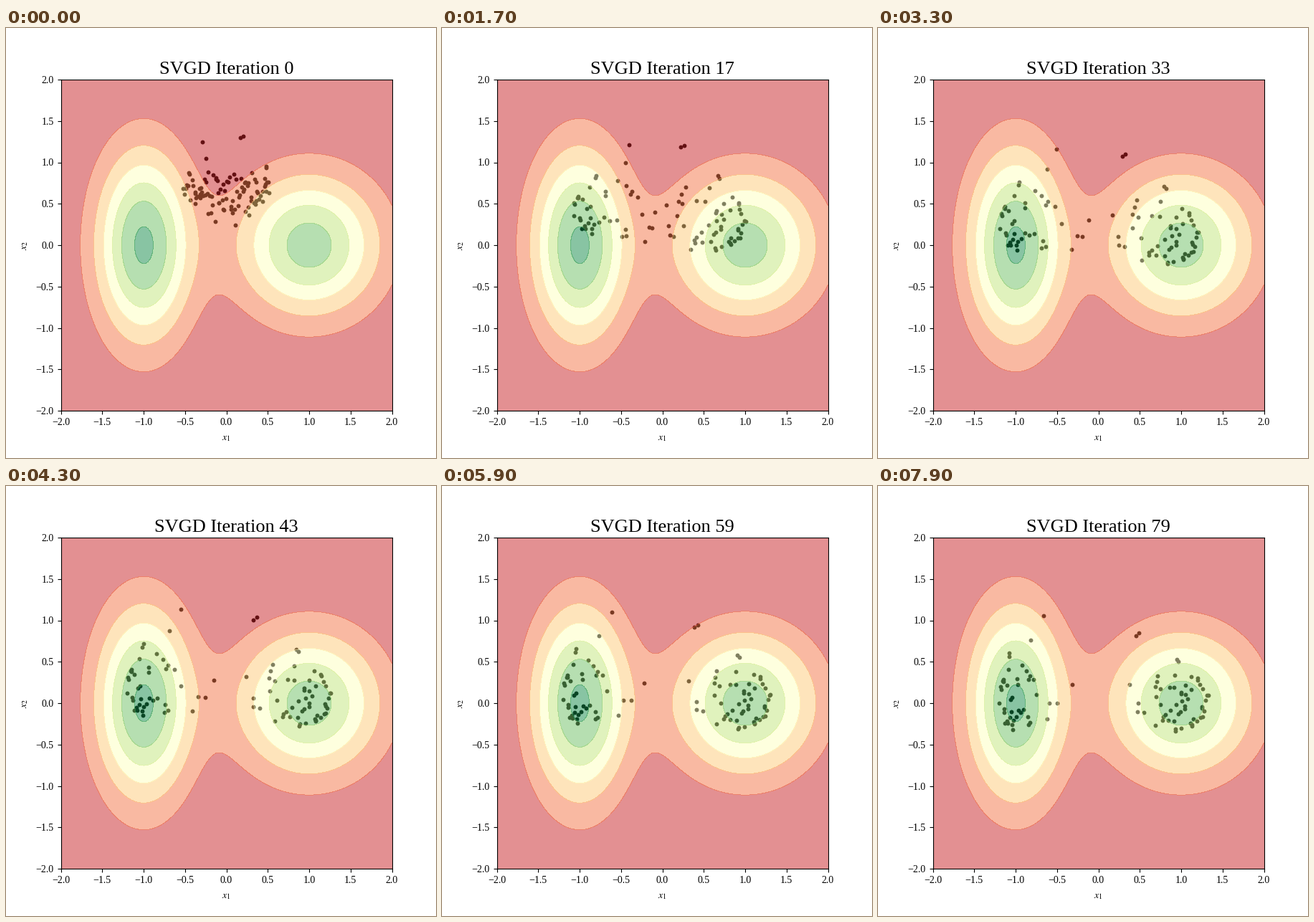
A matplotlib script that plays this animation: 600 by 600 pixels, repeating every 8000 ms.

```python
import numpy as np
import matplotlib.pyplot as plt
from matplotlib.animation import FuncAnimation

plt.rcParams["font.family"] = "Liberation Serif"
plt.rcParams["mathtext.fontset"] = "stix"

FRAMES, INTERVAL = 80, 100
COUNT, STEP = 100, 0.1

# Two equally weighted Gaussians with diagonal covariance
MEANS = np.array([[-1.0, 0.0], [1.0, 0.0]])
VARS = np.array([[0.16, 0.64], [0.36, 0.36]])

# The stragglers around the rim of the starting cloud
RIM = [(-0.29, 1.25), (0.17, 1.30), (0.20, 1.32), (-0.25, 1.05),
       (0.48, 0.95), (0.27, 0.36), (0.11, 0.24), (-0.13, 0.29)]


def components(x):
    """Weighted density of each Gaussian at the points x (n, 2)."""
    d = x[:, None] - MEANS
    norm = 4 * np.pi * np.sqrt(VARS.prod(axis=1))
    return np.exp(-0.5 * (d**2 / VARS).sum(axis=2)) / norm


def score(x):
    w = components(x)
    w /= w.sum(axis=1, keepdims=True)
    return (w[..., None] * (MEANS - x[:, None]) / VARS).sum(axis=1)


def start_points():
    """Crescent-shaped cloud: dense along its lower edge, thinner above."""
    rng = np.random.default_rng(4)
    n = COUNT - len(RIM)
    x = np.linspace(-0.52, 0.53, n) + rng.normal(0, 0.01, n)
    height = 0.75 - 0.7 * np.abs(x)
    y = 0.33 + x**2 + height * rng.beta(1.3, 2, n)
    return np.vstack([RIM, np.column_stack([x, y])])


def advance(x):
    diff = x[:, None] - x
    sq = (diff**2).sum(axis=2)
    h = np.median(sq) / np.log(COUNT)
    k = np.exp(-sq / h)
    push = 0.17 * h**-1.4 * (k[..., None] * diff).sum(axis=1)
    return x + STEP / COUNT * (k @ score(x) + push)


path = [start_points()]
while len(path) < FRAMES:
    path.append(advance(path[-1]))

fig, ax = plt.subplots(figsize=(6, 6), dpi=100)
dots = ax.scatter(*path[0].T, s=18, c="black", linewidths=0)

axis = np.linspace(-2, 2, 200)
gx, gy = np.meshgrid(axis, axis)
density = components(np.column_stack([gx.ravel(), gy.ravel()])).sum(axis=1)
ax.contourf(gx, gy, density.reshape(gx.shape), levels=np.arange(8) * 0.04,
            cmap="RdYlGn", alpha=0.5)

ticks = np.arange(-2, 2.1, 0.5)
ax.set(xlim=(-2, 2), ylim=(-2, 2), xticks=ticks, yticks=ticks, aspect="equal")
ax.set_xlabel("$x_1$", labelpad=7)
ax.set_ylabel("$x_2$", labelpad=6)
title = ax.set_title("", fontsize=19)


def update(i):
    dots.set_offsets(path[i])
    title.set_text(f"SVGD Iteration {i}")
    return dots, title


anim = FuncAnimation(fig, update, frames=FRAMES, interval=INTERVAL,
                     repeat=True, repeat_delay=0)
plt.show()
```
